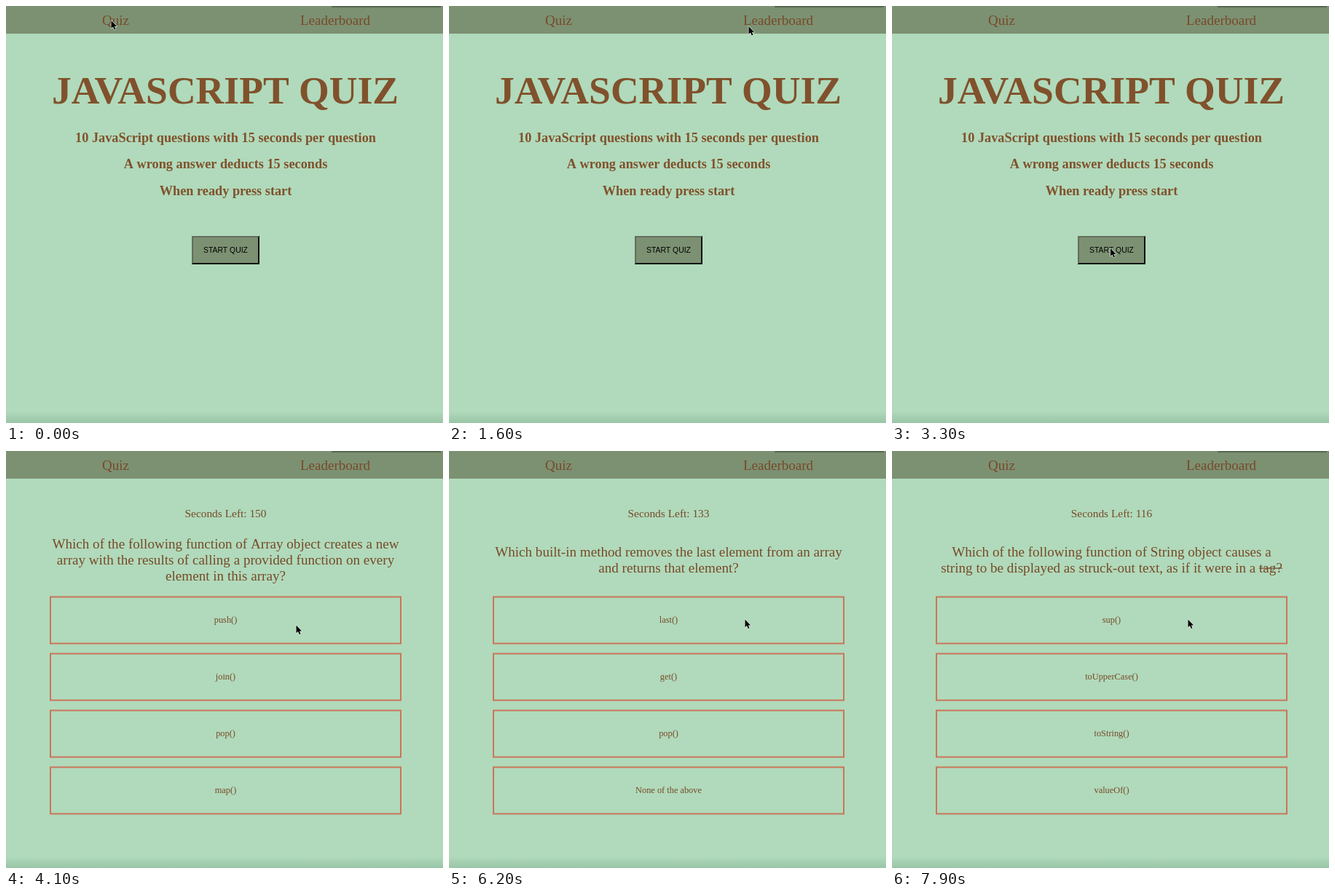
Write an HTML page with a canvas that moves like this. It is 600 by 573 pixels and loops after 8000 ms.

```html
<!DOCTYPE html>
<html lang="en">
<head>
<meta charset="utf-8">
<title>Quiz</title>
<style>
  html, body { margin: 0; width: 100%; height: 100%; overflow: hidden; background: #b0dabb; }
  canvas { display: block; }
</style>
</head>
<body>
<canvas id="stage" width="600" height="573"></canvas>
<script>
const ctx = document.getElementById('stage').getContext('2d');
const W = 600, H = 573, LOOP = 8000, MID = 301.5;
const SERIF = '"Liberation Serif", "Times New Roman", serif';
const SANS = '"Liberation Sans", Arial, sans-serif';
const PAGE = '#b0dabb', NAV = '#7c9172', BROWN = '#80512c', INK = '#774a29', EDGE = '#cb755a';

const QUIZ_START = 3400;
const questions = [
  { at: QUIZ_START,
    lines: ['Which of the following function of Array object creates a new',
            'array with the results of calling a provided function on every',
            'element in this array?'],
    options: ['push()', 'join()', 'pop()', 'map()'] },
  { at: 4700,
    lines: ['Which of the following is a valid type of function javascript', 'supports?'],
    options: ['named function', 'anonymous function', 'Both of the above.', 'None of the above'] },
  { at: 5900,
    lines: ['Which built-in method removes the last element from an array', 'and returns that element?'],
    options: ['last()', 'get()', 'pop()', 'None of the above'] },
  { at: 6800,
    lines: ['Which built-in method calls a function for each element in the', 'array?'],
    options: ['while()', 'loop()', 'forEach()', 'None of the above'] },
  { at: 7800,
    lines: ['Which of the following function of String object causes a',
            'string to be displayed as struck-out text, as if it were in a tag?'],
    struck: 'tag?',
    options: ['sup()', 'toUpperCase()', 'toString()', 'valueOf()'] }
];

// Each tick takes a second off; penalties land on the tick after a wrong answer.
const secondsLeft = [[QUIZ_START, 150], [4400, 149], [5400, 133], [6400, 117], [7400, 116]];

// Pointer path: time, x, y
const path = [
  [0, 144.5, 20], [100, 144.5, 20], [450, 255, 240], [900, 440, 19], [1400, 440, 19],
  [1600, 411.5, 28], [1800, 411.5, 28], [2000, 430, 20], [2300, 430, 20], [2750, 291.5, 262],
  [2850, 291.5, 262], [3200, 300, 333], [3500, 300, 333], [4050, 398.5, 239.5],
  [4150, 398.5, 239.5], [4500, 406.5, 231.5], [LOOP, 406.5, 231.5]
];

const between = (v, a, b) => v >= a && v < b;

function text(str, y, size, { x = MID, color = INK, font = SERIF, weight = '', align = 'center' } = {}) {
  ctx.font = `${weight} ${size}px ${font}`;
  ctx.fillStyle = color;
  ctx.textAlign = align;
  ctx.fillText(str, x, y);
}

function rect(color, x, y, w, h) {
  ctx.fillStyle = color;
  ctx.fillRect(x, y, w, h);
}

function fade(y, h, from, to) {
  const g = ctx.createLinearGradient(0, y, 0, y + h);
  g.addColorStop(0, from);
  g.addColorStop(1, to);
  return g;
}

function drawPage() {
  rect(PAGE, 0, 0, W, H);
  rect(fade(557, 16, 'rgba(60,110,80,0)', 'rgba(60,110,80,.2)'), 0, 557, W, 16);
  rect(NAV, 0, 0, W, 38);
  rect(fade(0, 3, 'rgba(40,55,40,.65)', 'rgba(40,55,40,0)'), 447, 0, 150, 3);
  text('Quiz', 26, 19, { x: 150.5 });
  text('Leaderboard', 26, 19, { x: 452 });
}

function drawIntro() {
  const bold = { weight: 'bold', color: BROWN };
  text('JAVASCRIPT QUIZ', 134, 53.6, { ...bold, x: 301 });
  text('10 JavaScript questions with 15 seconds per question', 187, 18.3, bold);
  text('A wrong answer deducts 15 seconds', 223, 18.3, bold);
  text('When ready press start', 260, 18.3, bold);
  rect('#0d100c', 255, 316, 93, 39);
  rect('#6c7467', 255, 316, 92, 38);
  rect('#0d100c', 256.5, 317.5, 91.5, 37.5);
  rect(NAV, 256.5, 317.5, 89.5, 35.5);
  text('START QUIZ', 338.5, 10.4, { font: SANS, color: '#000' });
}

function drawQuestion(t) {
  const { lines, options, struck } = questions.findLast(q => q.at <= t);
  const seconds = secondsLeft.findLast(s => s[0] <= t)[1];
  text('Seconds Left: ' + seconds, 90.5, 15.4);

  lines.forEach((line, i) => {
    const y = 155.5 + (i - (lines.length - 1) / 2) * 22;
    text(line, y, 19.1);
    if (struck && line.endsWith(struck)) {
      const w = ctx.measureText(struck).width;
      rect(INK, MID + ctx.measureText(line).width / 2 - w, y - 6, w, 1.2);
    }
  });

  options.forEach((option, i) => {
    const y = 200.5 + i * 78;
    ctx.strokeStyle = EDGE;
    ctx.lineWidth = 2;
    ctx.strokeRect(61, y, 481, 64);
    text(option, y + 35.5, 12.35);
  });
}

function drawStatus() {
  ctx.beginPath();
  ctx.roundRect(-2, 559, 202, 18, [0, 3, 0, 0]);
  ctx.fillStyle = '#bdd3c4';
  ctx.fill();
  ctx.strokeStyle = '#98b3a1';
  ctx.lineWidth = 1;
  ctx.stroke();
  text('/Users/navor/Desktop/.../leaderboard.html', 570, 9.1,
    { x: 3, align: 'left', color: '#5f6b64', font: 'Inter, sans-serif' });
}

function pointerAt(t) {
  const i = path.findIndex(p => p[0] > t);
  const [t0, x0, y0] = path[i - 1], [t1, x1, y1] = path[i];
  const k = (t - t0) / (t1 - t0), e = k * k * (3 - 2 * k);
  return [x0 + (x1 - x0) * e, y0 + (y1 - y0) * e];
}

function drawArrow(x, y) {
  ctx.save();
  ctx.translate(x, y);
  ctx.lineJoin = 'round';
  ctx.stroke(setArrowStyle());
  ctx.fill(arrow);
  ctx.restore();
}

const arrow = new Path2D('M0 0V10.8L2.5 8.6L4.2 12.5L6 11.7L4.3 8H7.6Z');
function setArrowStyle() {
  ctx.strokeStyle = 'rgba(235,245,238,.85)';
  ctx.lineWidth = 1.4;
  ctx.fillStyle = '#000';
  return arrow;
}

function drawBeam(x, y) {
  ctx.strokeStyle = '#26332a';
  ctx.lineWidth = 1;
  ctx.stroke(new Path2D(`M${x - 2} ${y - 5}h4M${x} ${y - 5}v10M${x - 2} ${y + 5}h4`));
}

function frame() {
  const t = performance.now() % LOOP;
  const intro = t < QUIZ_START;
  drawPage();
  if (intro) drawIntro();
  else drawQuestion(t);
  if (between(t, 1100, 1500) || between(t, 2000, 3000)) drawStatus();

  const [x, y] = pointerAt(t);
  const overText = intro && between(x, 210, 392) && between(y, 244, 266);
  (overText ? drawBeam : drawArrow)(x, y);
  requestAnimationFrame(frame);
}
frame();
</script>
</body>
</html>
```
